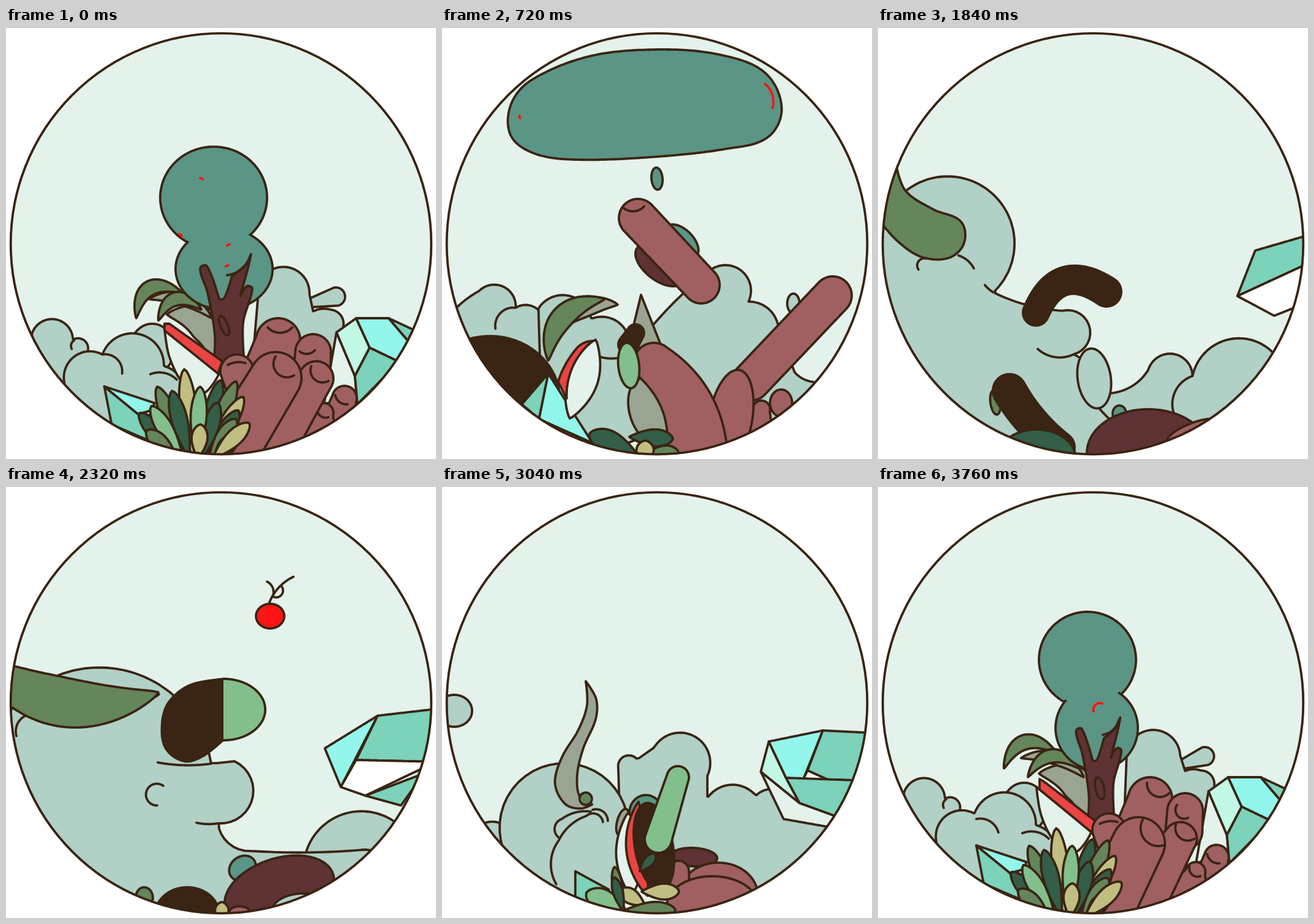
Write an HTML page with a canvas that moves like this. It is 700 by 701 pixels and loops after 3840 ms.

```html
<!DOCTYPE html>
<html>
<head>
<meta charset="utf-8">
<style>
html, body { margin: 0; width: 100%; height: 100%; overflow: hidden; background: #fff; }
canvas { display: block; }
</style>
</head>
<body>
<canvas id="stage" width="700" height="701"></canvas>
<script>
const ctx = document.getElementById('stage').getContext('2d');
const INK = '#3a2413', SKY = '#e3f2eb', CLOUD = '#b1d0c6', TREE = '#5b9585', BARK = '#5f3234',
  SKIN = '#a06061', DARK = '#335e47', MOSS = '#65855b', LIGHT = '#83bf8c', KHAKI = '#c1be82',
  GREY = '#99a592', RED = '#ea4444', BERRY = '#ff1414', AQUA = '#92f6eb', MINT = '#c2f8e6',
  TEAL = '#7cd2ba', WHITE = '#fff';
const STEP = 80, FRAMES = 48, SAMPLES = 200, KEYS = [0, 9, 15, 23, 29, 38, 47, 48];
const { PI, sin, cos, hypot, atan, atan2 } = Math;
const parts = [];

const range = (n, f) => Array.from({ length: n + 1 }, (_, i) => f(i / n));
const parse = text => text.split(' ').map(s => s.split(',').map(parseFloat));
const poly = parse;

// Ellipse, or an open arc of it when angles (degrees) are given.
function blob(x, y, rx, ry, tilt = 0, from = -180, to = 180) {
  const r = tilt * PI / 180;
  const pts = range(80, t => {
    const a = (from + (to - from) * t) * PI / 180, u = rx * cos(a), v = ry * sin(a);
    return [x + u * cos(r) - v * sin(r), y + u * sin(r) + v * cos(r)];
  });
  pts.open = to - from < 360;
  return pts;
}

// Outline of a bent spine whose half width is radius(t), with optional round caps.
function limb(x1, y1, x2, y2, bend, radius, caps) {
  const dx = x2 - x1, dy = y2 - y1;
  const edge = (t, side) => {
    const arch = 2 * t * (1 - t) * bend, slope = 2 * (1 - 2 * t) * bend;
    const tx = dx + dy * slope, ty = dy - dx * slope, k = side * radius(t) / hypot(tx, ty);
    return [x1 + dx * t + dy * arch + ty * k, y1 + dy * t - dx * arch - tx * k];
  };
  const cap = t => {
    const [ax, ay] = edge(t, t ? 1 : -1), [bx, by] = edge(t, t ? -1 : 1);
    return caps ? blob((ax + bx) / 2, (ay + by) / 2, radius(t), radius(t), atan2(ay - by, ax - bx) * 180 / PI, 0, 180) : [];
  };
  return [...range(40, t => edge(t, 1)), ...cap(1), ...range(40, t => edge(1 - t, -1)), ...cap(0)];
}
const pod = (x1, y1, r1, x2, y2, r2, bend = 0) => limb(x1, y1, x2, y2, bend, t => r1 + (r2 - r1) * t, true);
const leaf = (x1, y1, x2, y2, w, bend = 0) => limb(x1, y1, x2, y2, bend, t => w * sin(PI * t) ** .8);
const petal = (x1, y1, x2, y2, w) => limb(x1, y1, x2, y2, 0, t => w * Math.max(0, sin(PI * t ** 1.4)) ** .6);

// Chain of circular arcs: "x,y,h", where h is the bulge towards the next point per chord length.
function arcs(text, open = false) {
  const knots = parse(text), out = [];
  knots.forEach(([x, y, h = 0], i) => {
    const next = knots[(i + 1) % knots.length];
    if (open && i === knots.length - 1) return out.push([x, y]);
    const dx = next[0] - x, dy = next[1] - y, half = 2 * atan(2 * h), heading = atan2(dy, dx);
    out.push(...range(24, t => {
      const len = hypot(dx, dy) * (half ? sin(half * t) / sin(half) : t), a = heading - half * (1 - t);
      return [x + len * cos(a), y + len * sin(a)];
    }));
  });
  out.open = open;
  return out;
}

// Smooth closed curve through a few points; "!" marks a corner.
function curve(text) {
  const pts = parse(text), corner = text.split(' ').map(s => s.endsWith('!')), n = pts.length;
  const tangent = (i, len) => {
    const a = pts[(i + n - 1) % n], b = pts[(i + 1) % n], k = corner[i] ? 0 : len / 3 / hypot(b[0] - a[0], b[1] - a[1]);
    return [(b[0] - a[0]) * k, (b[1] - a[1]) * k];
  };
  return pts.flatMap((p, i) => {
    const j = (i + 1) % n, q = pts[j], len = hypot(q[0] - p[0], q[1] - p[1]);
    const u = tangent(i, len), v = tangent(j, len);
    return range(16, t => [0, 1].map(k => {
      const s = 1 - t;
      return s ** 3 * p[k] + 3 * s * s * t * (p[k] + u[k]) + 3 * s * t * t * (q[k] - v[k]) + t ** 3 * q[k];
    }));
  });
}

const scaled = (pts, x, y, sx, sy) => pts.map(p => [x + (p[0] - x) * sx, y + (p[1] - y) * sy]);

// Evenly spaced samples; closed outlines start at their top left so that they morph without twisting.
function resample(pts) {
  const { open } = pts;
  let path = pts;
  if (!open) {
    const first = pts.reduce((best, p, i) => p[0] + p[1] < pts[best][0] + pts[best][1] ? i : best, 0);
    path = [...pts.slice(first), ...pts.slice(0, first + 1)];
  }
  const dist = [0];
  for (let i = 1; i < path.length; i++) dist.push(dist[i - 1] + hypot(path[i][0] - path[i - 1][0], path[i][1] - path[i - 1][1]));
  let j = 0;
  const out = range(SAMPLES, t => {
    const want = t * dist[dist.length - 1];
    while (j < path.length - 2 && dist[j + 1] < want) j++;
    const k = (want - dist[j]) / (dist[j + 1] - dist[j] || 1);
    return [0, 1].map(c => path[j][c] + (path[j + 1][c] - path[j][c]) * k);
  });
  out.open = open;
  return out;
}

// A missing pose is a point pushed outward from the centre of the stage.
function ghost(pose) {
  const mean = k => pose.reduce((sum, p) => sum + p[k], 0) / pose.length;
  const x = 350 + (mean(0) - 350) * 1.5, y = 351 + (mean(1) - 351) * 1.5;
  return pose.map(() => [x, y]);
}

// Poses by key; the last key repeats the first one unless given.
function shape(fill, poses, stroke = INK) {
  const all = { 6: poses[0], ...poses };
  parts.push({ fill, stroke, poses: KEYS.slice(0, 7).map((_, k) => all[k] && resample(all[k])) });
}
function line(poses, stroke = INK) {
  const open = Object.entries(poses).map(([k, text]) => [k, text && arcs(text, true)]);
  shape(null, Object.fromEntries(open), stroke);
}
// Facets given as letters that pick from shared vertices.
function gem(colours, keys) {
  colours.forEach((colour, i) => {
    const poses = {};
    for (const k in keys) {
      const verts = parse(keys[k][0]), face = keys[k][1].split(' ')[i];
      if (face && face !== '-') poses[k] = [...face].map(c => verts[c.charCodeAt(0) - 97]);
    }
    shape(colour, poses);
  });
}

// Clouds
shape(CLOUD, { 0: pod(500, 446, 8, 537, 437, 15), 6: pod(498, 450, 8, 532, 438, 15) });
shape(CLOUD, { 1: blob(572, 448, 10, 16) });
shape(CLOUD, {
  0: arcs('400,560 410,440,.57 494,433 500,461,.1 528,458,.35 540,500 530,570'),
  1: arcs('340,600 320,512,.03 435,395,.4 499,445,.2 548,490 574,560,-.1 608,576 560,660 450,700'),
  2: arcs('285,600 275,533,.02 400,464,.15 489,464,.2 552,474,.18 602,460,-.2 645,525 560,690 400,690'),
  3: arcs('360,620 378,594,-.12 440,556,.43 512,566,.3 643,528 690,560 560,700 400,700'),
  4: arcs('489,592,.25 632,544 660,640 500,640'),
  5: arcs('290,560 287,458,.4 318,443 345,424,.48 432,470 432,506,.25 511,502,.2 560,500 650,550 600,640 500,710 330,650'),
  6: arcs('400,560 405,430,.44 492,437 500,462,.1 525,461,.35 540,500 530,570')
});
line({ 3: '512,566,-.2 481,625' });
shape(CLOUD, {
  0: arcs('42,498,.43 109,507,.4 131,530 128,590 60,590'),
  1: arcs('10,470,.05 60,428,.35 120,455,.35 165,490 165,600 40,600'),
  2: arcs('25,450,-.08 22,335,.3 40,314,.12 117,365,.35 148,394,.2 168,447 175,560 60,560'),
  5: arcs('60,552,.2 108,556 120,620 60,600')
});
line({ 0: '107,522,.2 111,508', 1: '87,489,.25 120,455', 2: '108,441,.2 115,403,.25 148,394' });
shape(CLOUD, { 0: blob(238, 522, 36, 41) });
shape(CLOUD, {
  0: arcs('100,590,.38 157,531,.43 257,550,.2 290,600 290,680 150,680'),
  1: arcs('157,456,.34 243,473,.25 305,510,.1 340,660 240,700 160,560'),
  2: arcs('168,436,.15 262,443,.46 262,484,.15 274,533,.1 287,570 290,670 180,670 160,560'),
  3: arcs('0,300 45,265,.48 188,430,-.05 300,460,.5 318,531,.15 342,560 342,590,-.05 378,637 360,720 150,720 -20,450'),
  4: arcs('-10,390,.36 334,450 372,446,.42 345,547,-.2 400,592,-.02 592,589 650,720 150,730 -20,500'),
  5: arcs('100,590,.57 303,545 285,700 170,700')
});
line({ 0: '157,531,.25 189,562', 5: '186,646,.15 190,575,.1 235,535,.3 262,545', 6: '160,540,.2 196,562' });
line({ 0: '235,563,.15 278,572', 1: '258,535,-.1 305,530', 2: '230,485,-.05 268,482', 3: '260,522,-.15 318,531', 4: '310,546,-.05 345,547', 5: '190,570,.3 195,540,.1 242,528' });
line({ 2: '236,486,-.3 274,533', 3: '174,418,-.05 188,430', 4: '247,448,-.04 334,450', 5: '245,525,.25 270,543' });
line({ 3: '66,393,.35 78,375', 4: '17,405,.35 60,374' });
line({ 3: '131,370,.1 156,391', 4: '256,486,-.7 246,518' });
shape(CLOUD, { 3: blob(352, 570, 27, 49, -8) });
shape(CLOUD, { 5: blob(20, 364, 29, 26) });

// Palm
shape(GREY, {
  0: leaf(338, 550, 262, 466, 26, -.6),
  1: blob(336, 622, 31, 53, -15),
  2: blob(345, 675, 58, 27, 38),
  5: blob(294, 545, 9, 22, 15)
});
shape(GREY, {
  0: leaf(335, 472, 233, 441, 10, -.3),
  1: leaf(195, 487, 286, 450, 14, .3),
  4: leaf(197, 342, 249, 337, 8),
  5: curve('234,316! 251,345 250,378 230,425 220,470 225,505 245,516! 225,523 200,515 184,482 195,440 222,395 236,355')
});
shape(MOSS, {
  0: leaf(287, 431, 212, 472, 12, -.75),
  1: leaf(265, 441, 173, 541, 18, -.45),
  2: leaf(192, 620, 185, 495, 13),
  3: curve('30,225! 45,265 90,295 135,315 140,350 115,374 70,372 30,345 0,310!'),
  4: leaf(-60, 270, 249, 334, 40, -.3),
  5: blob(234, 507, 10, 10),
  6: leaf(290, 432, 205, 458, 12, -.7)
});
shape(MOSS, {
  0: leaf(318, 458, 248, 476, 11, -.75),
  3: blob(191, 609, 8, 20, -8),
  4: blob(225, 668, 14, 17),
  6: leaf(328, 458, 244, 472, 11, -.65)
});
shape(GREY, { 1: poly('324,434 358,520 303,520'), 2: poly('306,550 323,572 292,572') });

// Tree
const trunk = curve('338,545! 340,500 328,430 316,391 327,387 347,441! 355,440 368,403! 390,385 399,367! 394,390 381,437! 392,420 401,424 386,480 388,545!');
shape(TREE, {
  0: blob(338, 276, 87, 83),
  1: curve('150,204 112,175 112,125 145,85 240,46 350,35 450,43 525,72 553,130 530,178 460,197 340,210 215,214'),
  3: blob(393, 627, 11, 13),
  4: blob(385, 620, 23, 19, -35),
  5: blob(332, 530, 27, 29),
  6: blob(341, 281, 79, 78)
});
shape(TREE, { 0: blob(355, 392, 79, 66, 0, -57, 221), 1: blob(350, 245, 9, 18, -5), 6: blob(356, 392, 67, 68, 0, -57, 221) });
shape(TREE, { 1: blob(390, 347, 34, 19, 45) });
shape(BARK, {
  0: trunk,
  1: blob(354, 386, 46, 24, 38),
  2: blob(426, 617, 20, 10, 45),
  3: blob(440, 691, 100, 71),
  4: blob(445, 658, 92, 54, -18),
  5: blob(410, 602, 38, 15, 3),
  6: scaled(trunk, 365, 545, .87, .96)
});
line({ 0: '360,402,-.15 398,370', 6: '366,403,-.15 392,379' });
shape(BARK, { 0: blob(355, 484, 6, 17, -22), 6: blob(361, 490, 7, 18, -12) });
shape(CLOUD, { 4: blob(485, 690, 52, 29) });

// Dark arch, small crystal and striped sail
shape(INK, {
  1: blob(78, 605, 114, 104),
  2: pod(150, 498, 45, 215, 640, 25, -.65),
  3: pod(214, 590, 27, 295, 682, 25, -.1),
  4: blob(295, 695, 52, 44)
});
gem([TEAL, AQUA], {
  0: ['160,583 242,610 236,622 215,628 235,672 172,645', 'adef abcd'],
  1: ['173,562 245,675 158,636 130,612', 'acd abc'],
  5: ['217,625 272,655 240,690 217,670', 'abcd -']
});
shape(SKY, {
  0: curve('258,488! 348,560! 320,595 290,580 266,535'),
  1: leaf(208, 635, 250, 507, 25),
  5: leaf(308, 665, 303, 530, 22)
});
shape(RED, {
  0: poly('258,481 266,481 352,542 345,562 258,492'),
  1: arcs('189,575,.05 220,520,.1 245,509,-.12 203,603'),
  2: arcs('137,608,.25 228,597 222,614,-.15'),
  5: leaf(335, 665, 320, 512, 16, .15),
  6: poly('263,475 270,479 356,545 348,562 263,492')
});

gem([SKY, MINT, AQUA, TEAL, WHITE, TEAL], {
  0: ['538,495 570,472 623,472 670,494 658,513 640,543 592,520 568,566 572,612 518,610', 'ahij abgh bcefg cde - gfih'],
  2: ['700,282 700,400 677,325', '- - - abc'],
  3: ['614,362 700,337 700,383 585,436 700,446 645,468', '- - - abcd dcef'],
  4: ['519,425 605,372 700,361 700,447 570,444 545,488 585,502 680,466 643,518', '- - abf bcde edgf ghi'],
  5: ['519,463 532,414 620,396 700,400 700,478 588,476 560,473 582,514 640,535 630,553 556,540 595,461 628,476', 'ahijk abgh bcfg cdeml lmf geih']
});

// Fingers
shape(SKIN, { 0: pod(443, 508, 36, 430, 560, 44), 1: pod(319, 309, 31, 422, 418, 30), 2: pod(342, 247, 36, 402, 112, 31) });
line({ 0: '426,487,-.22 466,487', 1: '296,293,-.2 329,290', 2: '319,260,.4 367,269', 6: '438,481,-.35 474,498' });
shape(SKIN, { 0: pod(500, 527, 29, 498, 560, 30), 1: pod(503, 575, 31, 636, 435, 31), 2: pod(615, 420, 38, 680, 440, 46, .2) });
line({ 0: '478,526,-.2 503,524', 2: '600,403,.5 606,451', 6: '487,517,-.4 505,538' });
shape(SKIN, { 0: pod(551, 602, 20, 540, 640, 25), 1: blob(552, 610, 18, 22) });
line({ 0: '536,597,-.2 556,612' });
shape(SKIN, { 0: pod(517, 626, 16, 500, 680, 45), 1: pod(520, 620, 14, 510, 670, 30), 2: blob(545, 632, 20, 10, -35) });
line({ 0: '507,617,-.3 525,633' });
shape(SKIN, {
  0: pod(505, 570, 28, 425, 680, 46),
  1: blob(470, 635, 35, 80, 10),
  2: blob(485, 635, 36, 38),
  5: blob(450, 664, 64, 53),
  6: pod(492, 572, 27, 420, 680, 46)
});
line({ 0: '497,550,-.35 525,574', 6: '485,549,-.35 515,572' });
shape(SKIN, { 0: pod(376, 558, 27, 385, 600, 22), 2: blob(465, 607, 27, 14, -20), 5: pod(385, 625, 17, 385, 655, 18) });
line({ 0: '361,548,.1 390,545', 2: '449,612,.15 475,604' });
shape(SKIN, {
  0: pod(439, 569, 42, 362, 695, 45),
  1: pod(345, 545, 33, 415, 695, 50, .25),
  2: pod(265, 612, 37, 435, 695, 36, .55),
  3: blob(512, 656, 44, 13, -22),
  4: blob(380, 692, 17, 10),
  5: blob(440, 680, 74, 47),
  6: pod(424, 580, 43, 368, 695, 45)
});
line({ 0: '439,534,-.4 469,565', 2: '231,604,.35 276,633', 6: '431,541,-.35 467,582' });

// Drifting pod with its light half
shape(INK, {
  1: pod(315, 496, 14, 303, 515, 16),
  2: curve('284,445 298,436 313,447! 325,430 338,440 335,490 322,511 305,505 292,470'),
  3: pod(257, 463, 21, 372, 429, 24, .6),
  4: curve('254,385 265,350 300,322 357,312! 353,412! 320,438 290,446 260,425'),
  5: blob(345, 585, 31, 72, -10)
});
shape(LIGHT, {
  1: blob(304, 549, 17, 37, -6),
  2: blob(303, 498, 5, 10),
  4: blob(354, 362, 68, 50, 0, -90, 90),
  5: pod(352, 573, 22, 384, 472, 18)
});

// Succulent: colour, angle in degrees and length of each petal, back to front, with other poses
[
  [KHAKI, -7, 146, { 5: petal(330, 680, 290, 655, 12) }],
  [MOSS, -28, 132, { 5: petal(292, 690, 281, 618, 8) }],
  [DARK, 18, 134, { 5: petal(322, 625, 347, 597, 8) }],
  [MOSS, 28, 142],
  [KHAKI, 38, 127, { 5: petal(325, 658, 386, 658, 13) }],
  [DARK, -51, 117, { 1: petal(315, 690, 240, 660, 18), 2: pod(238, 658, 22, 310, 705, 18), 3: blob(258, 700, 64, 47) }],
  [DARK, 42, 105, { 1: petal(305, 665, 376, 668, 14) }],
  [LIGHT, -40, 111, { 5: petal(300, 690, 235, 660, 18) }],
  [DARK, -19, 116, { 5: petal(295, 690, 280, 635, 8) }],
  [DARK, 22, 98],
  [LIGHT, 4, 117],
  [MOSS, 46, 92, { 1: petal(335, 690, 385, 690, 11), 5: petal(295, 690, 380, 688, 14) }],
  [MOSS, -60, 91],
  [DARK, 62, 75],
  [KHAKI, 57, 105],
  [KHAKI, 9, 56, { 1: petal(330, 710, 331, 671, 14), 2: blob(337, 697, 15, 11), 4: petal(352, 710, 351, 675, 11) }]
].forEach(([colour, angle, length, others]) => {
  const a = angle * PI / 180;
  shape(colour, { 0: petal(308 + angle * .5, 700, 308 + length * sin(a), 700 - length * cos(a), 13), ...others });
});

// Berries
[[318, 245, 1], [284, 337, 2], [362, 353, -1], [360, 387, -1]].forEach(([x, y, dip]) =>
  line({ 0: `${x - 2},${y - dip},.1 ${x + 2},${y + dip}`, 6: null }, BERRY));
line({ 1: '126,143 127,147' }, BERRY);
line({ 1: '526,91,.15 538,130', 6: '351,365,.3 365,352' }, BERRY);
line({ 4: '428,190,.1 468,146' });
line({ 4: '425,154,.2 434,178,-.4 449,162' });
shape(BERRY, { 4: blob(430, 210, 23, 20) });

function drawPart({ fill, stroke, poses }, key, u) {
  const from = poses[key], to = poses[(key + 1) % 7];
  if (!from && (!to || !u)) return;
  // Detail lines vanish early when they have no next pose.
  if (!fill && ((!to && u > .35) || (!from && u < .65))) return;
  const a = from || ghost(to), b = to || ghost(from);
  ctx.beginPath();
  a.forEach(([x, y], i) => ctx.lineTo(x + (b[i][0] - x) * u, y + (b[i][1] - y) * u));
  if (!(from || to).open) ctx.closePath();
  ctx.fillStyle = fill;
  if (fill) ctx.fill();
  ctx.strokeStyle = stroke;
  ctx.stroke();
}

function draw(now) {
  const frame = Math.floor(now / STEP) % FRAMES;
  let key = 6;
  while (KEYS[key] > frame) key--;
  let u = (frame - KEYS[key]) / (KEYS[key + 1] - KEYS[key]);
  if (key === 0) u = u ** 1.5;
  if (key === 5) u = 1 - (1 - u) ** 1.5;

  ctx.fillStyle = WHITE;
  ctx.fillRect(0, 0, 700, 701);
  const globe = new Path2D();
  globe.arc(350, 351, 342.3, 0, 2 * PI);
  ctx.save();
  ctx.clip(globe);
  ctx.fillStyle = SKY;
  ctx.fill(globe);
  ctx.lineWidth = 3.8;
  ctx.lineJoin = ctx.lineCap = 'round';
  parts.forEach(part => drawPart(part, key, u));
  ctx.restore();
  ctx.strokeStyle = INK;
  ctx.lineWidth = 3.8;
  ctx.stroke(globe);
  requestAnimationFrame(draw);
}
requestAnimationFrame(draw);
</script>
</body>
</html>
```
